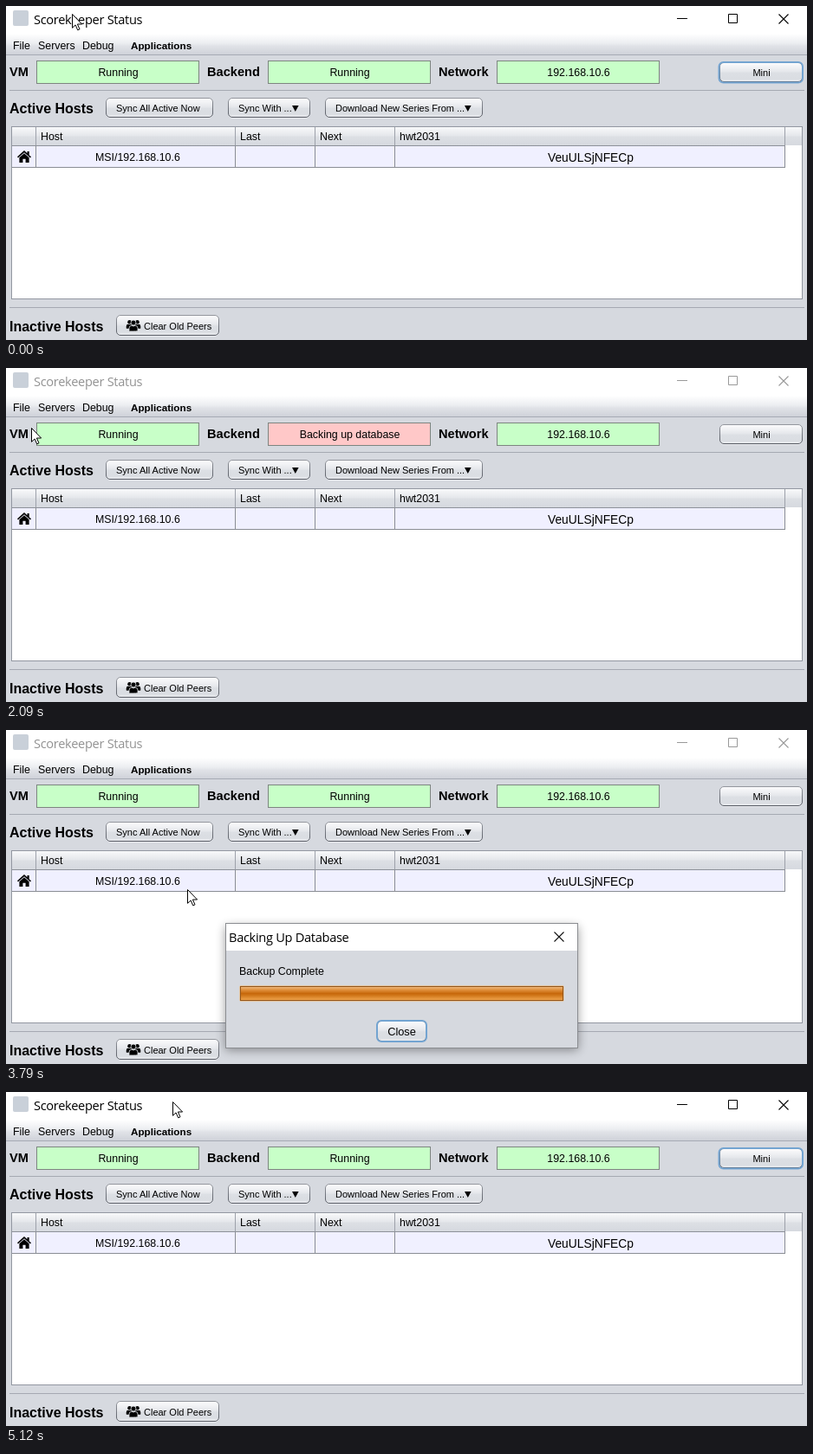
Recreate the animation shown at these times as an HTML page. Size 924 by 386 pixels, loop 5200 ms.

```html
<!DOCTYPE html>
<html lang="en">
<head>
<meta charset="utf-8">
<title>Scorekeeper Status</title>
<style>
  html, body { margin: 0; width: 100%; height: 100%; overflow: hidden; background: #d6d9df; }
  svg { display: block; width: 924px; height: 386px; }
  text { font: 12.4px "Liberation Sans", Arial, sans-serif; white-space: pre; }
  .title { font: 14.6px "Open Sans", "Noto Sans", sans-serif; letter-spacing: -.3px; }
  .small { font-size: 11px; }
  .head { font-size: 16px; font-weight: bold; }
  .label { font-size: 14.6px; font-weight: bold; }
  .mid { text-anchor: middle; }
</style>
</head>
<body>
<svg id="stage" viewBox="0 0 924 386" xmlns="http://www.w3.org/2000/svg"></svg>
<script>
const LOOP = 5200;
const CELL = 27;

// ---- markup helpers ----
const text = (x, y, str, cls = "", extra = "") =>
  `<text x="${x}" y="${y}" class="${cls}" ${extra}>${str}</text>`;
const rect = (x, y, w, h, fill, extra = "") =>
  `<rect x="${x}" y="${y}" width="${w}" height="${h}" fill="${fill}" ${extra}/>`;
const path = (d, extra = "") => `<path d="${d}" ${extra}/>`;
const gradient = (id, ...stops) =>
  `<linearGradient id="${id}" x2="0" y2="1">${stops.map(([at, color]) =>
    `<stop offset="${at}" stop-color="${color}"/>`).join("")}</linearGradient>`;
const frame = (x, y, w, h, fill, stroke, extra = "") =>
  rect(x + .5, y + .5, w - 1, h - 1, fill, `stroke="${stroke}" ${extra}`);
const button = (x, y, w, h, id = "") =>
  rect(x + 1, y + 1.5, w - 2, h - .5, "#f1f2f5", 'rx="4.5" opacity=".7"') +
  frame(x, y, w, h, "url(#face)", "url(#edge)", `rx="4.5" ${id && `id="${id}"`}`);
const ring = (x, y, w, h, id = "") =>
  rect(x, y, w, h, "none", `rx="5" stroke="#73a4d1" stroke-width="2" ${id && `id="${id}"`}`);
const status = (x, name, id = "") =>
  frame(x, 63, 188, 27, "#c8ffc8", "#7d8580", id && `id="${id}Box"`) +
  text(x + 94.5, 81, name, "mid", id && `id="${id}Text"`);
const arrow = x => path(`M${x} 115h7.6l-3.8 7z`);
const rule = y => rect(4, y, 917, 1, "#a5a9b2");
const person = (x, y, s) =>
  `<g transform="translate(${x} ${y}) scale(${s})"><circle cy="3" r="3"/>
   <path d="M-5 12.5V9.5Q-5 6.3-2.2 6.3Q0 7.6 2.2 6.3Q5 6.3 5 9.5V12.5Q5 13-4.5 13Z"/></g>`;

const defs = `<defs>
  ${gradient("face", [0, "#fcfcfd"], [.45, "#e6e8ec"], [.55, "#dcdfe4"], [.85, "#dadde2"], [1, "#eff0f3"])}
  ${gradient("pressed", [0, "#858b96"], [.3, "#a4a9b3"], [.7, "#adb2bb"], [1, "#c5c9d1"])}
  ${gradient("edge", [0, "#93969d"], [1, "#575b64"])}
  ${gradient("bar", [0, "#ffffff"], [.45, "#eceef1"], [.6, "#e0e2e7"], [1, "#cfd2d9"])}
  ${gradient("header", [0, "#f8f9fa"], [.45, "#e6e8ec"], [.55, "#dcdfe4"], [1, "#d6d9df"])}
  ${gradient("full", [0, "#f1bd83"], [.25, "#df8f3b"], [.5, "#c7680b"], [.6, "#cd7214"], [1, "#f0a64f"])}
  ${gradient("blob", [0, "#e3a45f"], [.45, "#d17a20"], [.55, "#cb7013"], [1, "#e6a04b"])}
  ${gradient("trough", [0, "#c6c9cf"], [.3, "#eceded"], [1, "#fafafa"])}
  <pattern id="cells" width="${CELL}" height="16" y="297" patternUnits="userSpaceOnUse">
    <path d="M0 7Q3.5 6.5 6 3.5Q8.5 1.5 13.5 1.5Q18.5 1.5 21 3.5Q23.5 6.5 27 7V8.2Q23.5 9 21 11.8
      Q18.5 13.5 13.5 13.5Q8.5 13.5 6 11.8Q3.5 9 0 8.2Z" fill="url(#blob)"/>
    <path d="M7.5 3v9.5M19.5 3v9.5" stroke="#efbd85" opacity=".6"/>
  </pattern>
  <filter id="soft" x="-10%" y="-20%" width="120%" height="140%"><feGaussianBlur stdDeviation="6"/></filter>
</defs>`;

const titleBar = rect(0, 0, 924, 32, "#fff") +
  rect(8, 5, 18, 18, "#c9d0d9", 'rx="2"') +
  `<g id="caption">${text(32, 21, "Scorekeeper Status", "title")}</g>
  <g id="controls" fill="none" stroke="#000">
    ${path("M774 14.5h12M833.5 9.5h10v10h-10z")}
    ${path("M891.5 9.5l11 11m0-11l-11 11", 'stroke-width="1.1"')}
  </g>`;

const menuBar = rect(0, 32, 924, 24, "url(#bar)") + rect(0, 56, 924, 1, "#a6abb5") +
  rect(4, 36, 29, 20, "#39698a", 'id="fileMark"') +
  text(8, 50, "File", "", 'id="file"') + text(37, 50, "Servers") + text(88, 50, "Debug") +
  text(144, 50, "Applications", "", 'style="font-weight:bold;font-size:11.7px"');

const statusRow = text(4, 81, "VM", "label") + status(35, "Running") +
  text(232, 81, "Backend", "label") + status(302, "Running", "backend") +
  text(499, 81, "Network", "label") + status(566, "192.168.10.6") +
  button(823, 65, 96, 23) + ring(822.5, 65, 96.5, 23.5, "miniRing") +
  text(871.5, 81, "Mini", "small mid") + rule(97);

const hostRow = text(4, 124, "Active Hosts", "head") +
  button(115, 106, 124, 23) + text(127, 122, "Sync All Active Now", "small") +
  button(256, 106, 95, 23) + text(268, 122, "Sync With ...", "small") + arrow(330) +
  button(368, 106, 182, 23) + text(380, 122, "Download New Series From ...", "small") + arrow(529);

const table = frame(6, 139, 913, 200, "#fff", "#9297a1") +
  rect(7, 140, 911, 21, "url(#header)") + rect(7, 161, 892, 1, "#8d9199") +
  rect(7, 162, 891, 24, "#f0f0ff") + rect(7, 186, 892, 1, "#8a8d94") +
  [34, 264, 356, 448, 898].map(x =>
    rect(x, 140, 1, 21, "#9da1aa") + rect(x, 162, 1, 25, "#8a8d94")).join("") +
  text(40, 155, "Host") + text(270, 155, "Last") + text(362, 155, "Next") + text(454, 155, "hwt2031") +
  path("M13 174.3L21 167L24.5 170.2V168H26.7V172.2L29 174.3L28 175.5L21 169.2L14 175.5Z") +
  path("M15.4 175.2L21 170.2L26.6 175.2V181H22.6V176.8H19.4V181H15.4Z") +
  text(103, 179, "MSI/192.168.10.6") +
  text(625, 180, "VeuULSjNFECp", "", 'style="font-size:13.8px"');

const footer = rule(348) + text(4, 376, "Inactive Hosts", "head") +
  button(127, 357, 119, 24) +
  person(142.5, 363, .75) + person(151.5, 363, .75) +
  `<g stroke="#e4e6ea" stroke-width=".8">${person(147, 363, 1)}</g>` +
  text(159, 374, "Clear Old Peers", "small");

const popup = `<g id="popup">${frame(4, 55, 135, 90, "#eef0f3", "#73777f")}
  ${rect(5, 62, 133, 19, "#39698a", 'id="itemMark"')}
  ${rect(5, 119, 133, 1, "#a3a7b0")}
  ${text(17, 75, "Backup Database", "", 'id="item"')}
  ${text(17, 94, "Import Backup Data")}${text(17, 113, "Delete Local Series")}${text(17, 134, "Shutdown")}</g>`;

const dialog = `<g id="dialog">
  ${rect(253, 227, 407, 143, "#000", 'opacity=".38" filter="url(#soft)"')}
  ${frame(253, 223, 407, 145, "#d6d9df", "#8b8d91")}
  ${rect(254, 224, 405, 31, "#fff")}
  ${text(257, 245, "Backing Up Database", "title")}
  ${path("M632.5 233.5l11 11m0-11l-11 11", 'id="cross" stroke="#111" stroke-width="1.1"')}
  ${text(269, 283, "", "", 'id="message"')}
  <g id="busy">${frame(271, 297, 371, 15, "url(#trough)", "#a4a6aa")}
    ${rect(272, 297, 369, 15, "url(#cells)")}</g>
  <g id="done">${rect(269.5, 295.5, 374, 18, "none", 'stroke="#e3c6a2" rx="1.5"')}
    ${frame(270, 296, 373, 17, "url(#full)", "#93551a")}</g>
  ${button(428, 336, 57, 24, "close")}${ring(428, 336, 57, 24)}
  ${text(456.5, 353, "Close", "mid", 'style="font-size:12.8px"')}</g>`;

const pointer = path("M.5 .5V16.3L4.1 12.9L6.7 18.8L9 17.8L6.4 12H11.6Z",
  'id="pointer" fill="#fff" stroke="#000" stroke-linejoin="round"');

const stage = document.getElementById("stage");
stage.innerHTML = defs + rect(0, 0, 924, 386, "#d6d9df") + titleBar + menuBar + statusRow +
  hostRow + table + footer + dialog + popup + pointer;

const el = {};
stage.querySelectorAll("[id]").forEach(node => el[node.id] = node);
const set = (id, name, value) => el[id].setAttribute(name, value);
const show = (id, on) => set(id, "visibility", on ? "inherit" : "hidden");

// ---- timing: bursts of evenly spaced picture changes [from, to, count] ----
const steps = [0];
for (const [from, to, n] of [
  [60, 380, 5], [600, 680, 2], [920, 920, 1], [1620, 1860, 4], [2090, 2550, 7],
  [2630, 2860, 4], [3560, 4040, 7], [4190, 4650, 7], [4740, 5120, 6]
]) for (let i = 0; i < n; i++) steps.push(n > 1 ? from + (to - from) * i / (n - 1) : from);

// Pointer moves: [first step, last step, x, y]
const moves = [
  [60, 380, 28, 42], [600, 680, 24.5, 45], [1620, 1860, 29, 69],
  [3560, 4040, 492, 366], [4190, 4350, 469, 357], [4740, 5120, 192, 11]
];

const clamp = v => Math.min(1, Math.max(0, v));
const ease = v => (1 - Math.cos(Math.PI * v)) / 2;
const within = (t, a, b) => t >= a && t < b;

function pointerAt(t) {
  let x = 76, y = 9;
  for (const [from, to, px, py] of moves) {
    const k = ease(clamp((t - from + 80) / (to - from + 80)));
    if (t < from) break;
    x += (px - x) * k;
    y += (py - y) * k;
  }
  return [x, y].map(Math.round);
}

function dialogAlpha(t) {
  if (t < 2160 || t > 4780) return 0;
  if (t > 4600) return t < 4700 ? .5 : .08;
  return t < 2200 ? .35 : t < 2300 ? .8 : t < 2390 ? .95 : 1;
}

function draw(time) {
  const t = steps.filter(s => s <= time).pop();
  const active = !within(t, 2090, 4560);
  const menu = within(t, 920, 2090);
  const [x, y] = pointerAt(t);
  const picked = menu && y >= 62;
  const backing = within(t, 2090, 2850);
  const complete = t >= 2780;
  const alpha = dialogAlpha(t);
  const scale = alpha < .9 ? .93 + .07 * alpha : 1;

  set("pointer", "transform", `translate(${x} ${y})`);
  set("caption", "fill", active ? "#000" : "#929292");
  set("controls", "stroke", active ? "#000" : "#999");
  show("miniRing", t < 920 || t >= 4560);

  show("fileMark", menu);
  set("file", "fill", menu ? "#fff" : "#000");
  show("popup", menu);
  show("itemMark", picked);
  set("item", "fill", picked ? "#fff" : "#000");

  set("backendBox", "fill", backing ? "#ffc8c8" : "#c8ffc8");
  el.backendText.textContent = backing ? "Backing up database" : "Running";

  show("dialog", alpha > 0);
  set("dialog", "opacity", alpha);
  set("dialog", "transform", `translate(456.5 295.5) scale(${scale}) translate(-456.5 -295.5)`);
  set("cross", "opacity", t < 2390 ? .75 : 1);
  show("cross", t < 4560);
  el.message.textContent = complete ? "Backup Complete" : "Backing up database ...";
  show("busy", !complete);
  show("done", complete);
  const shift = Math.floor((t - 2300) / 50) * CELL / 5;
  set("cells", "x", 267.5 + (shift % CELL));
  set("close", "fill", t >= 4410 ? "url(#pressed)" : "url(#face)");
}

const start = performance.now();
function tick() {
  draw((performance.now() - start) % LOOP);
  requestAnimationFrame(tick);
}
tick();
</script>
</body>
</html>
```
